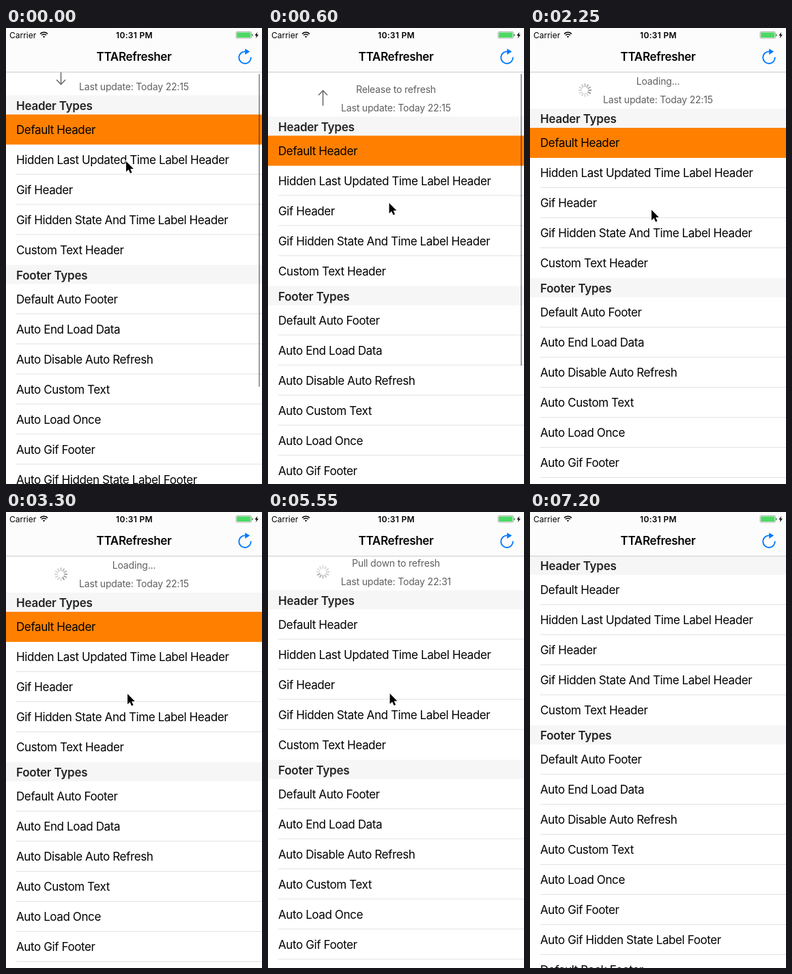
An HTML page for the animation above (7480 ms loop, 375 by 667 pixels).

```html
<!DOCTYPE html>
<html lang="en">
<head>
<meta charset="utf-8">
<title>Pull to refresh</title>
<style>
  html, body { margin: 0; width: 100%; height: 100%; overflow: hidden; background: #fff; }
  #stage {
    position: relative; width: 375px; height: 667px; overflow: hidden; background: #fff;
    font: 17px/44px Inter, Roboto, "Liberation Sans", sans-serif;
    letter-spacing: -.4px; color: #000; white-space: nowrap;
  }
  #stage svg { position: absolute; left: 0; top: 0; overflow: visible; }

  #table { position: absolute; left: 0; top: 64px; width: 375px; }
  .head {
    height: 28px; padding-left: 15px; background: #f6f6f6;
    font-weight: 600; line-height: 30px; letter-spacing: -.24px; color: #232323;
  }
  .row { position: relative; height: 44px; padding-left: 15px; }
  .row:not(.last)::after {
    content: ""; position: absolute; left: 15px; right: 0; bottom: 0;
    height: 1px; background: #e2e2e4;
  }
  .row.on { background: #ff8000; }
  .row.on::after { display: none; }

  #pull { position: absolute; left: 0; top: -54px; width: 375px; height: 54px; }
  #pull div {
    height: 27px; text-align: center; color: #5f5f5f;
    font-size: 14px; line-height: 27px; letter-spacing: -.17px;
  }

  #bar {
    position: absolute; left: 369.5px; top: 67px; width: 2.5px;
    border-radius: 1.25px; background: rgba(0, 0, 0, .38);
  }
  #nav {
    position: absolute; left: 0; top: 0; width: 375px; height: 64px;
    background: #fcfcfc; border-bottom: 1px solid #cbcbcd;
  }
  #nav div { position: absolute; }
  #carrier, #clock { top: 0; font-size: 12px; line-height: 21px; letter-spacing: 0; }
  #carrier { left: 5px; }
  #clock { left: 0; width: 376px; text-align: center; font-weight: 600; letter-spacing: .3px; }
  #title {
    left: 0; top: 20px; width: 375px; text-align: center;
    font-weight: 600; letter-spacing: -.33px;
  }
</style>
</head>
<body>
<div id="stage">
  <div id="table">
    <div id="pull">
      <div id="state"></div>
      <div id="time"></div>
      <svg width="375" height="54">
        <path id="arrow" d="M0 11.3V-11M-6.5 -4.3L0 -11L6.5 -4.3" fill="none" stroke="#666" stroke-width="1.5"/>
        <g id="spinner" transform="translate(80.5 27)" stroke="#6e6e72" stroke-width="1.9" stroke-linecap="round"></g>
      </svg>
    </div>
  </div>
  <div id="bar"></div>
  <div id="nav">
    <div id="carrier">Carrier</div>
    <div id="clock">10:31 PM</div>
    <div id="title">TTARefresher</div>
    <svg width="375" height="64">
      <g fill="none" stroke="#000" stroke-width="1.5">
        <path d="M50.1 8.6A7.6 7.6 0 0 1 60.9 8.6"/>
        <path d="M52 10.6A4.9 4.9 0 0 1 59 10.6"/>
        <path d="M55.5 14.3L53.9 12.6A2.3 2.3 0 0 1 57.1 12.6Z" fill="#000" stroke="none"/>
      </g>
      <rect x="337" y="5.5" width="22.5" height="9.6" rx="1.7" fill="none" stroke="#000" stroke-opacity=".5" stroke-width=".6"/>
      <rect x="338.1" y="6.6" width="20.3" height="7.4" rx=".8" fill="#4cd964"/>
      <path d="M360.4 8.6Q361.7 9 361.7 10.4T360.4 12.2Z" fill="#555"/>
      <path d="M368.4 6L364.4 11H366.8L365.8 15L369.9 9.7H367.4Z"/>
      <path d="M358.8 42.6A8.8 8.8 0 1 1 350.5 34.4" fill="none" stroke="#007aff" stroke-width="1.9"/>
      <path d="M350.2 30.3L357.2 34.6L350.2 38.9Z" fill="#007aff"/>
    </svg>
  </div>
  <svg width="375" height="667">
    <path id="cursor" d="M0 0V15.2L3.5 12L6 17.6L8.5 16.5L6.1 11.1H10.8Z" fill="#000" stroke="#fff" stroke-width="1.6" paint-order="stroke"/>
  </svg>
</div>
<script>
const LOOP = 7480, HOLD = 150, LAST = 7200;
const REST = 54;                  // height of the pull area
const RELEASE = 1870, DONE = 5480;

const sections = {
  "Header Types": ["Default Header", "Hidden Last Updated Time Label Header", "Gif Header",
    "Gif Hidden State And Time Label Header", "Custom Text Header"],
  "Footer Types": ["Default Auto Footer", "Auto End Load Data", "Auto Disable Auto Refresh",
    "Auto Custom Text", "Auto Load Once", "Auto Gif Footer",
    "Auto Gif Hidden State Label Footer", "Default Back Footer"]
};

const $ = id => document.getElementById(id);
const table = $("table"), arrow = $("arrow"), spinner = $("spinner"), bar = $("bar"), cursor = $("cursor");

function add(cls, text) {
  const el = document.createElement("div");
  el.className = cls;
  el.textContent = text;
  table.append(el);
}

for (const [name, rows] of Object.entries(sections)) {
  add("head", name);
  rows.forEach((row, i) => add(i === rows.length - 1 ? "row last" : "row", row));
}
const picked = table.querySelector(".row");

for (let i = 0; i < 12; i++) {
  const spoke = document.createElementNS("http://www.w3.org/2000/svg", "path");
  spoke.setAttribute("d", "M0 -5.4V-9");
  spoke.setAttribute("transform", `rotate(${i * 30})`);
  spinner.append(spoke);
}

const part = (t, start, length) => Math.min(1, Math.max(0, (t - start) / length));
const easeOut = u => 1 - (1 - u) ** 2;
const easeInOut = u => u < .5 ? 2 * u * u : 1 - 2 * (1 - u) ** 2;
const half = v => Math.round(v * 2) / 2;

const pulled = t => 34.5 + 31.5 * easeOut(part(t, 0, 700)) + 4.5 * easeOut(part(t, 1100, 400));

function offset(t) {
  const hold = pulled(t);
  const back = easeInOut(part(t, RELEASE, 400));
  const close = easeInOut(part(t, DONE, 400));
  return half((hold + (REST - hold) * back) * (1 - close));
}

function pointer(t) {
  const drag = (pulled(t) - 34.5) / 36;
  const drift = part(t, 4000, 300), settle = part(t, 5400, 400);
  const leave = easeInOut(part(t, 6300, 800));
  return [
    176 + 2 * drag + settle + 187 * leave,
    195 + 71 * drag - 2 * drift + 4 * settle + 390 * leave
  ];
}

function draw(t) {
  const y = offset(t);
  const loading = t >= RELEASE && t < DONE;
  const armed = t < RELEASE && y >= REST;

  table.style.transform = `translateY(${y}px)`;
  picked.classList.toggle("on", t < DONE);
  $("state").textContent = loading ? "Loading..." : armed ? "Release to refresh" : "Pull down to refresh";
  $("time").textContent = "Last update: Today " + (t < DONE ? "22:15" : "22:31");

  const turn = 180 * (1 - easeInOut(part(t, 260, 250)));
  arrow.setAttribute("transform", `translate(80.5 27) rotate(${turn})`);
  arrow.style.display = t < RELEASE ? "" : "none";

  spinner.style.opacity = t < RELEASE ? 0 : 1 - part(t, DONE, 400);
  const lead = Math.floor((t - RELEASE) * 12 / 1000);
  [...spinner.children].forEach((spoke, i) => {
    const age = (((lead - i) % 12) + 12) % 12;
    spoke.style.opacity = Math.max(.28, .72 - age * .065);
  });

  bar.style.height = 492.5 - y + "px";
  bar.style.opacity = 1 - part(t, 1900, 300);

  const [cx, cy] = pointer(t);
  cursor.setAttribute("transform", `translate(${half(cx)} ${half(cy)})`);
  cursor.style.display = t < LAST ? "" : "none";
}

const start = performance.now();
function tick() {
  const t = (performance.now() - start) % LOOP;
  draw(Math.min(LAST, Math.floor(t / HOLD) * HOLD));
  requestAnimationFrame(tick);
}
tick();
</script>
</body>
</html>
```
